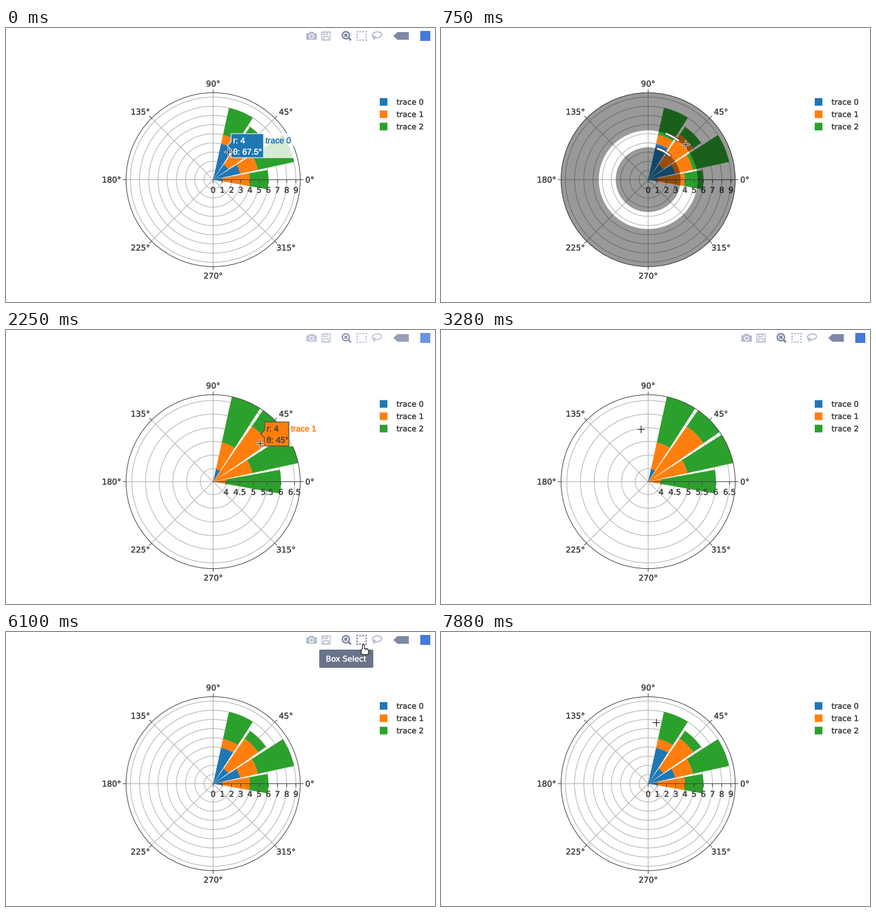
Recreate the animation shown at these times as a matplotlib script. Size 730 by 467 pixels, loop 8000 ms.

```python
from itertools import count, product

import matplotlib.pyplot as plt
import numpy as np
from matplotlib.animation import FuncAnimation
from matplotlib.patches import Circle, Ellipse, FancyBboxPatch, Polygon, Wedge
from matplotlib.patheffects import withStroke

W, H, DPI = 730, 467, 64
PT = 72 / DPI                      # points per pixel
INTERVAL, FRAMES, STEP = 40, 200, 148.7
CX, CY, R = 352.5, 258.5, 148.2
FULL, ZOOMED = (0, 9 / 0.95), (3.527, 6.71)
COLORS = "#1f77b4", "#ff7f0e", "#2ca02c"
INK, GRID = "#444444", "#b0b0b0"
IDLE, ACTIVE, BRAND = "#b3bbcf", "#7f89a5", "#447adb"

# stacked bar ends for each angle
STACKS = {0: (1, 4, 6), 22.5: (3, 5, 9), 45: (2, 6, 7), 67.5: (4, 5, 8)}
HALF_BAR = 10.125

# cursor glides: first step, last step, destination, ease-out power
START = np.array([378, 211])
GLIDES = [(1, 11, (432, 193), 2.4), (19, 22, (340, 169), 1), (29, 34, (557, 44), 1),
          (38, 41, (607, 21), 1), (41, 43, (631, 17), 1), (44, 50, (318, 142), 1),
          (50, 53, (366, 154), 1)]

plt.rcParams["path.snap"] = False
fig = plt.figure(figsize=(W / DPI, H / DPI), dpi=DPI, facecolor="white")
ax = fig.add_axes([0, 0, 1, 1])
layer = count(1)


def ramp(step, start, end, power=1):
    return 1 - (1 - np.clip((step - start) / (end - start), 0, 1)) ** power


def add(patch):
    patch.set_zorder(next(layer))
    ax.add_patch(patch)


def style(fill=None, edge=None, lw=1.09, alpha=None):
    return dict(facecolor=fill or "none", edgecolor=edge or "none",
                linewidth=lw * PT if edge else 0, alpha=alpha)


def disc(x, y, r, **kw):
    add(Circle((x, y), r, **style(**kw)))


def poly(points, **kw):
    add(Polygon(points, **style(**kw)))


def rect(x0, y0, x1, y1, **kw):
    poly([(x0, y0), (x1, y0), (x1, y1), (x0, y1)], **kw)


def rounded(x0, y0, x1, y1, r, **kw):
    add(FancyBboxPatch((x0 + r, y0 + r), x1 - x0 - 2 * r, y1 - y0 - 2 * r,
                       boxstyle=f"round,pad={r},rounding_size={r}", **style(**kw)))


def sector(start, end, r0, r1, **kw):
    add(Wedge((CX, CY), r1, -end, -start, width=r1 - r0, **style(**kw)))


def line(xs, ys, color, lw=1.09, alpha=None):
    ax.plot(xs, ys, color=color, lw=lw * PT, alpha=alpha, solid_capstyle="butt",
            zorder=next(layer))


def label(x, y, s, color=INK, size=13.1, ha="left", font="DejaVu Sans"):
    ax.text(x, y + 0.36 * size, s, color=color, fontsize=size * PT, ha=ha, va="baseline",
            family=font, zorder=next(layer),
            path_effects=[withStroke(linewidth=0.35 * PT, foreground=color)])


def polar(angle, r):
    a = np.radians(angle)
    return CX + r * np.cos(a), CY - r * np.sin(a)


def draw_plot(limits, ticks):
    low, high = limits

    def radius(value):
        return np.clip((value - low) / (high - low), 0, 1) * R

    for angle in range(0, 360, 45):
        line(*zip((CX, CY), polar(angle, R)), GRID)
    for tick in ticks:
        disc(CX, CY, radius(tick), edge=GRID)
    for angle, ends in STACKS.items():
        for start, end, color in zip((0,) + ends, ends, COLORS):
            if end > low:
                sector(angle - HALF_BAR, angle + HALF_BAR, radius(start), radius(end), fill=color)

    disc(CX, CY, R, edge=INK)
    line((CX, CX + R), (CY, CY), INK)
    for tick in ticks:
        x = CX + radius(tick)
        line((x, x), (CY, CY + 5.5), INK)
        label(x, 276, f"{tick:g}", size=13.6, ha="center")
    for angle in range(0, 360, 45):
        line(*zip(polar(angle, R), polar(angle, R + 5.5)), INK)
        ha = {0: "left", 180: "right"}.get(angle, "center")
        x = polar(angle, R + (27 if ha == "center" else 8.5))[0]
        label(x, polar(angle, R + 15.5)[1], f"{angle}°", size=13.6, ha=ha)


def draw_legend():
    for i, color in enumerate(COLORS):
        y = 126 + 21 * i
        rect(636, y - 6.5, 649, y + 6.5, fill=color)
        label(664.5, y, f"trace {i}")


def draw_zoom_ring(progress):
    inner, outer = (r * R / FULL[1] for r in ZOOMED)
    outer = inner + (outer - inner) * progress
    sector(0, 360, outer, R, fill="black", alpha=0.4)
    disc(CX, CY, inner, fill="black", alpha=0.4)
    for r in (inner, outer):
        half = np.degrees(13.6 / r)
        sector(60.5 - half, 60.5 + half, r - 2, r + 2, fill="white", edge=INK)


def draw_hover(point, r, theta, trace, text_color):
    x, y = point
    lines = f"r: {r}", f"θ: {theta:g}°"
    x0, h = x + 6.5, 20.5
    x1 = x0 + 6.9 * len(lines[1])
    color, font = COLORS[trace], "Liberation Sans"
    rect(x1, y - h, x1 + 50, y + h, fill="white", edge="white", alpha=0.8)
    poly([(x, y), (x0, y + 6.5), (x0, y + h), (x1, y + h), (x1, y - h), (x0, y - h),
          (x0, y - 6.5)], fill=color, edge=text_color)
    for s, dy in zip(lines, (-9.3, 10)):
        label(x0 + 3.3, y + dy, s, text_color, 14.2, font=font)
    label(x1 + 3.3, y - 9.3, f"trace {trace}", color, 14.2, font=font)


def draw_modebar(alpha, active):
    def tone(name):
        return ACTIVE if name in active else IDLE

    # camera
    rounded(511, 9, 529, 20, 1, fill=IDLE, alpha=alpha)
    rounded(516, 6.5, 524, 10, 1, fill=IDLE, alpha=alpha)
    disc(520, 14.3, 3.5, edge="white", lw=1.5, alpha=alpha)
    # floppy disk
    for box in ((537.5, 6.8, 551.5, 20.5), (540.5, 6.8, 546.5, 11.3), (540.5, 14.8, 548.5, 20.5)):
        rect(*box, edge=IDLE, lw=1.6, alpha=alpha)
    # magnifier
    line((583, 587), (17, 21), tone("zoom"), 3.4, alpha)
    disc(578.3, 12.3, 6, edge=tone("zoom"), lw=2.6, alpha=alpha)
    rect(575.6, 9.6, 581, 15, fill=tone("zoom"), alpha=alpha)
    # dotted box
    for i, j in product(range(4), repeat=2):
        if i in (0, 3) or j in (0, 3):
            x, y = 596 + 5.1 * i, 5 + 4.8 * j
            rect(x, y, x + 2.8, y + 2.5, fill=tone("box"), alpha=alpha)
    # lasso
    add(Ellipse((631.3, 11.6), 15.5, 10, angle=-8,
                **style(edge=tone("lasso"), lw=2, alpha=alpha)))
    disc(626.5, 15.7, 2, edge=tone("lasso"), lw=1.4, alpha=alpha)
    line((627, 626.5), (17.5, 21), tone("lasso"), 1.5, alpha)
    # tag and brand mark
    poly([(659, 13.5), (666, 7), (685.5, 7), (685.5, 20), (666, 20)], fill=ACTIVE, alpha=alpha)
    rect(705, 5, 722, 22, fill=BRAND, alpha=alpha)


def draw_tooltip(text, right):
    left = right - 32 - 6 * len(text)
    rounded(left, 30, right, 61, 2, fill="#69738a")
    label((left + right) / 2, 45.5, text, "white", ha="center")


def draw_cross(x, y):
    for color, lw, arm in (("white", 3, 7), ("black", 1.1, 6.3)):
        line((x - arm, x + arm), (y, y), color, lw)
        line((x, x), (y - arm, y + arm), color, lw)


def draw_arrow(x, y):
    shape = [(0, 0), (0, 14), (3.3, 11), (5.6, 16.3), (8, 15.3), (5.8, 10.2), (10, 10)]
    poly(np.add(shape, (x, y)), fill="black", edge="white")


def draw_hand(x, y):
    rounded(x - 1, y, x + 2.5, y + 13, 1.7, fill="white", edge="black")
    rounded(x - 3, y + 7, x + 9.5, y + 17, 3, fill="white", edge="black")
    rect(x - 0.4, y + 5, x + 1.9, y + 10, fill="white")
    for dx in (4, 6.5):
        line((x + dx, x + dx), (y + 7, y + 10), "black", 0.8)


def draw(frame):
    global layer
    layer = count(1)
    ax.clear()
    ax.set(xlim=(0, W), ylim=(H, 0))
    ax.axis("off")

    # the pose is held between steps
    step = int((frame * INTERVAL + 25) / STEP)
    if 14 <= step < 26:
        draw_plot(ZOOMED, np.arange(4, 6.6, 0.5))
    else:
        draw_plot(FULL, range(10))
    draw_legend()

    if 3 <= step < 14:
        draw_zoom_ring(ramp(step, 1, 11, 1.7))
    if step < 2:
        draw_hover((376.5, 200.6), 4, 67.5, 0, "white")
    elif 14 <= step < 20:
        draw_hover((433.6, 177.2), 4, 45, 1, INK)

    shown = 1 - ramp(step, 1, 3) + ramp(step, 13, 15.5) - ramp(step, 51, 53)
    hover = "box" if 40 <= step < 42 else "lasso" if 42 <= step < 45 else None
    if shown > 0:
        draw_modebar(shown, ("lasso" if step >= 43 else "zoom", hover))
    if hover:
        draw_tooltip(f"{hover.title()} Select", 625 if hover == "box" else 651)

    spot = START
    for first, last, goal, power in GLIDES:
        spot = spot + (np.array(goal) - spot) * ramp(step, first, last, power)
    x, y = spot + 0.5
    if hover:
        draw_hand(x, y)
    elif np.hypot(x - CX, y - CY) < R:
        draw_cross(x, y)
    else:
        draw_arrow(x, y)
    return []


animation = FuncAnimation(fig, draw, frames=FRAMES, interval=INTERVAL, repeat=True,
                          repeat_delay=0, blit=False)
plt.show()
```
